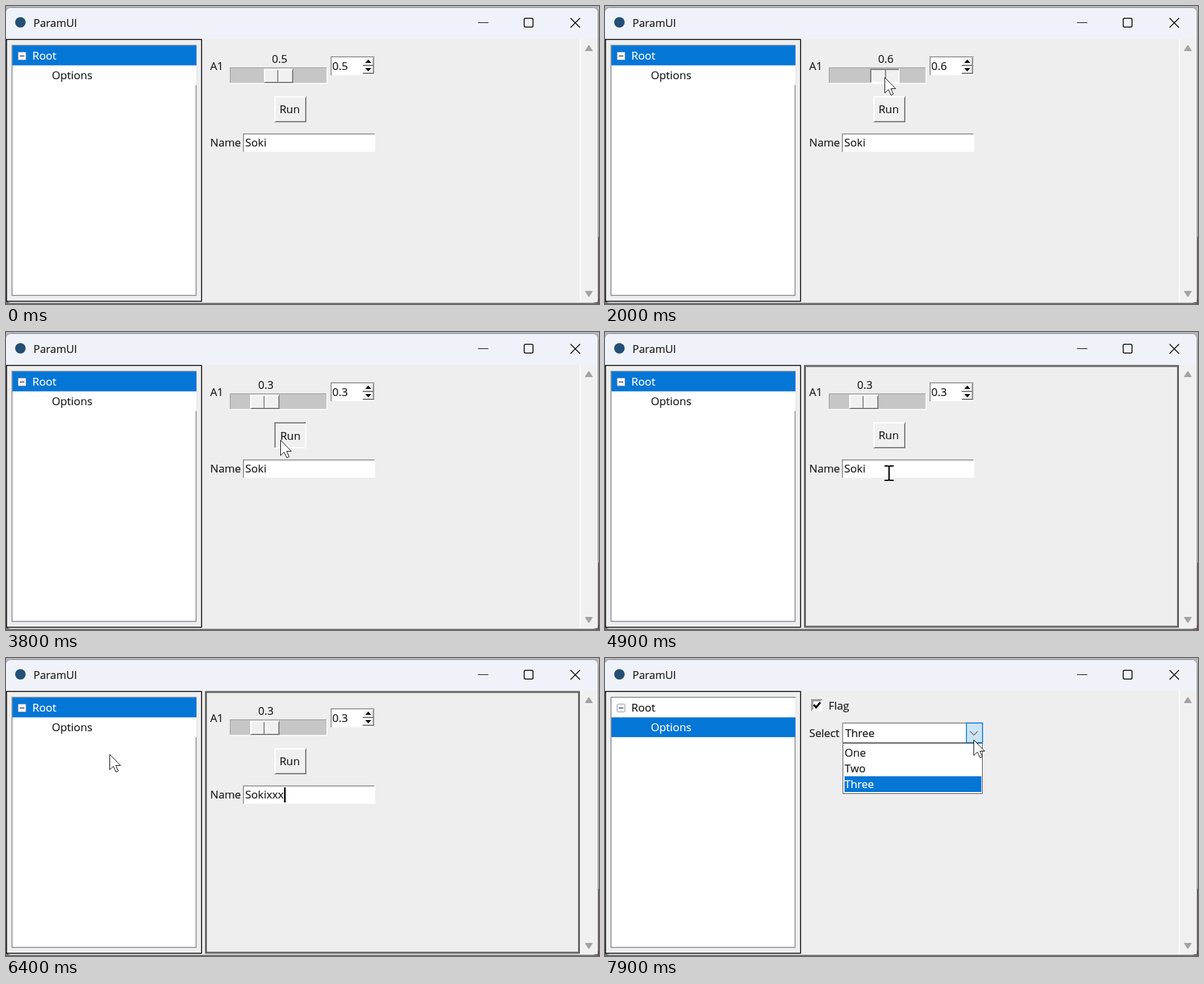
These frames come from a looping animation (906x456 px, 8 s). An HTML page:

```html
<!DOCTYPE html>
<html lang="en">
<head>
<meta charset="utf-8">
<title>ParamUI</title>
<style>
  html, body { margin: 0; width: 100%; height: 100%; overflow: hidden; background: #b6b6ba; }
  svg { display: block; width: 906px; height: 456px; }
  text {
    font: 16.8px "Open Sans", "Noto Sans", sans-serif; white-space: pre;
    color: #1c1c1c; fill: currentColor; stroke: currentColor; stroke-width: .2;
  }
  text.light { color: #fff; }
  .line { fill: none; stroke: #111; stroke-width: 1.5; }
  .white { fill: #fff; }
  .blue { fill: #0476d6; }
  .bevel path { fill: none; stroke-width: 2; }
  .bevel rect { fill: #f0f0f0; }
  .bevel .lit, .bevel.in .dim { stroke: #fff; }
  .bevel .dim, .bevel.in .lit { stroke: #828282; }
  .bevel.in text { transform: translate(1px, 1px); }
  .well rect { fill: #fff; }
  .well path { fill: none; stroke: #8c8c8c; stroke-width: 1.5; }
  .arrow { fill: #a3a3a3; stroke: #a3a3a3; stroke-linejoin: round; }
  .chevron { fill: none; stroke: #777; stroke-width: 1.5; }
  .off { display: none; }
</style>
</head>
<body>
<svg viewBox="0 0 906 456">
  <!-- window -->
  <path d="M0 440H906V456H0z" fill="#6f6f73"/>
  <path d="M904 353h2v103h-2z" fill="#6b5052"/>
  <rect x="-.5" y="2.5" width="905" height="452" rx="8" fill="#eee" stroke="#8b8b90"/>
  <path d="M0 50V11Q0 3 8 3H896Q904 3 904 11V50z" fill="#f0f2f9"/>
  <circle cx="22" cy="25" r="8" fill="#234f74"/>
  <text x="42" y="32" style="font-size:16.5px">ParamUI</text>
  <g class="line">
    <path d="M721 25.5H737" stroke-width="1" style="stroke-width:1"/>
    <path d="M862.5 18.5L877 33M877 18.5L862.5 33"/>
    <rect x="791.7" y="18.7" width="13.5" height="13.5" rx="2"/>
  </g>

  <!-- tree -->
  <rect class="line" x=".75" y="51.25" width="298" height="400.5"/>
  <rect x="9.2" y="60.2" width="281.2" height="382.6" fill="#fff" stroke="#828790" stroke-width="1.4"/>
  <path class="white" d="M10 61H291V121H10z"/>
  <rect id="row" class="blue" x="10" y="60.5" width="281" height="30.3"/>
  <rect x="18.5" y="70.5" width="12" height="12" rx="1" fill="#f6f6f6" stroke="#8c9aa8"/>
  <path d="M21 76.5h7" stroke="#3c4d80" stroke-width="1.5"/>
  <text id="root" x="40.3" y="82">Root</text>
  <text id="options" x="70" y="112">Options</text>

  <!-- scrollbar -->
  <path d="M878 50H904V453H878z" fill="#f0f0f0"/>
  <path d="M877.5 50V453" stroke="#fff" stroke-width="1.5"/>
  <path class="arrow" d="M885 68.5L890.5 60L896 68.5zM885 436.5L890.5 445L896 436.5z"/>

  <!-- first page -->
  <g id="main">
    <rect id="focus" x="305.5" y="52" width="570" height="399" fill="none" stroke="#656565" stroke-width="3"/>
    <text x="312" y="98">A1</text>
    <path d="M342 94H490V118H342z" fill="#c6c6c6"/>
    <path d="M342.5 118V94.5H490" fill="none" stroke="#999"/>
    <path d="M342 118.5H490.5V94" fill="none" stroke="#fff" stroke-width="1.5"/>
    <g id="thumb">
      <text id="label" x="418" y="87" text-anchor="middle">0.5</text>
      <g id="knob" class="bevel">
        <rect x="394" y="96" width="45" height="22"/>
        <path class="dim" d="M438 96V117H394M415.5 98V116"/>
        <path class="lit" d="M395 117V97H438M417.5 98V116"/>
      </g>
    </g>
    <g class="well">
      <rect x="496" y="77" width="67" height="29"/>
      <path d="M496.7 106V77.7H563"/>
    </g>
    <text id="spin" x="498.6" y="98">0.5</text>
    <g class="bevel">
      <rect x="545" y="79" width="17" height="25"/>
      <path class="lit" d="M546 91V80H561M546 103V93H561"/>
      <path class="dim" d="M561.5 79V91H545M561.5 92V103H545"/>
    </g>
    <path d="M549 87L553.5 82L558 87zM549 95H558L553.5 100z"/>
    <g id="run" class="bevel">
      <rect x="410" y="138" width="49" height="40"/>
      <path class="dim" d="M458 138V177H410"/>
      <path class="lit" d="M411 177V139H458"/>
      <text x="418" y="164">Run</text>
    </g>
    <text x="312" y="215">Name</text>
    <g class="well">
      <rect x="362" y="195" width="202" height="28"/>
      <path d="M362.7 223V195.7H563"/>
    </g>
    <text id="name" x="365.5" y="215">Soki</text>
    <rect id="caret" y="198" width="2.5" height="23"/>
  </g>

  <!-- second page -->
  <g id="extra">
    <g class="well">
      <rect x="315" y="63" width="17" height="18"/>
      <path d="M315.7 81V63.7H332M317.5 79V65.5H330"/>
    </g>
    <path d="M319 71.5L322.5 75.5L329 68" fill="none" stroke="#000" stroke-width="3"/>
    <text x="341.5" y="79">Flag</text>
    <text x="312" y="121">Select</text>
    <rect x="363" y="99.5" width="213.5" height="30" rx="1" fill="#fff" stroke="#7f7f7f" stroke-width="1.3"/>
    <rect id="hover" x="552.2" y="99.5" width="24.5" height="30" fill="#cce4f7" stroke="#0078d7" stroke-width="1.4"/>
    <path class="chevron" d="M557.5 112L563.5 118L569.5 112"/>
    <text x="367" y="121">Three</text>
    <g id="list">
      <rect x="363.5" y="130.5" width="213" height="77" fill="#fff" stroke="#555"/>
      <rect class="blue" x="366" y="181" width="209" height="24"/>
      <text x="366" y="151">One</text>
      <text x="366" y="175">Two</text>
      <text class="light" x="366" y="199">Three</text>
    </g>
  </g>

  <path id="pointer" d="M.5 .5V24L6 18.8L10 27.5L13.6 25.8L9.8 17.5H17z" fill="#fff" stroke="#111"/>
  <path id="beam" d="M-7 -11H-2Q0 -11 0 -9V9Q0 11 -2 11H-7M7 -11H2Q0 -11 0 -9M0 9Q0 11 2 11H7" fill="none" stroke="#000" stroke-width="2"/>
</svg>
<script>
  const LOOP = 8000, STEP = 100;
  const DRAG = [1000, 2500], SWITCH = 6800;

  // pointer stops: time, x, y
  const stops = [
    [100, 520, 430], [700, 416, 109], [1000, 416, 109], [1200, 427, 109],
    [1500, 448, 109], [1700, 448, 109], [2400, 395, 109], [2500, 395, 109],
    [2800, 419, 165], [3800, 419, 165], [4100, 434, 216], [5700, 434, 216],
    [5900, 455, 216], [6100, 335, 215], [6400, 158, 147], [6600, 122, 103],
    [7000, 122, 103], [7600, 563, 125]
  ];

  const $ = id => document.getElementById(id);
  const show = (id, on) => $(id).classList.toggle('off', !on);
  const within = (t, a, b) => t >= a && t < b;

  function pointerAt(t) {
    const i = stops.findIndex(s => s[0] > t);
    if (i < 1) return (i ? stops[stops.length - 1] : stops[0]).slice(1);
    const [t0, x0, y0] = stops[i - 1], [t1, x1, y1] = stops[i];
    const p = (t - t0) / (t1 - t0), k = p * p * (3 - 2 * p);
    return [x0 + (x1 - x0) * k, y0 + (y1 - y0) * k];
  }

  function drawSlider(t) {
    const [x] = pointerAt(Math.min(Math.max(t, DRAG[0]), DRAG[1]));
    const steps = Math.round((x - 416) / 10.6);
    $('thumb').setAttribute('transform', `translate(${Math.round(steps * 10.6)})`);
    $('label').textContent = $('spin').textContent = (0.5 + steps / 10).toFixed(1);
    $('knob').classList.toggle('in', within(t, ...DRAG));
  }

  function drawEntry(t) {
    const typed = Math.min(3, Math.max(0, Math.floor((t - 5000) / 200)));
    const name = $('name');
    name.textContent = 'Soki' + 'x'.repeat(typed);
    $('caret').setAttribute('x', 366 + name.getComputedTextLength());
    show('caret', t >= 5000 && (t - 5000) % 900 < 600);
  }

  function drawPointer(t) {
    const [x, y] = pointerAt(t).map(Math.round);
    const inEntry = t < SWITCH && x > 362 && x < 564 && y > 195 && y < 223;
    for (const id of ['pointer', 'beam'])
      $(id).setAttribute('transform', `translate(${x} ${y})`);
    show('pointer', t >= 100 && !inEntry);
    show('beam', inEntry);
  }

  function draw(t) {
    const second = t >= SWITCH;
    show('main', !second);
    show('extra', second);
    $('row').setAttribute('y', second ? 90.8 : 60.5);
    $('root').classList.toggle('light', !second);
    $('options').classList.toggle('light', second);
    show('focus', t >= 4300);
    $('run').classList.toggle('in', within(t, 3700, 3900));
    show('hover', t >= 7600);
    show('list', t >= 7800);
    drawSlider(t);
    if (!second) drawEntry(t);
    drawPointer(t);
  }

  (function tick() {
    const t = performance.now() % LOOP;
    draw(Math.floor(t / STEP) * STEP);
    requestAnimationFrame(tick);
  })();
</script>
</body>
</html>
```
